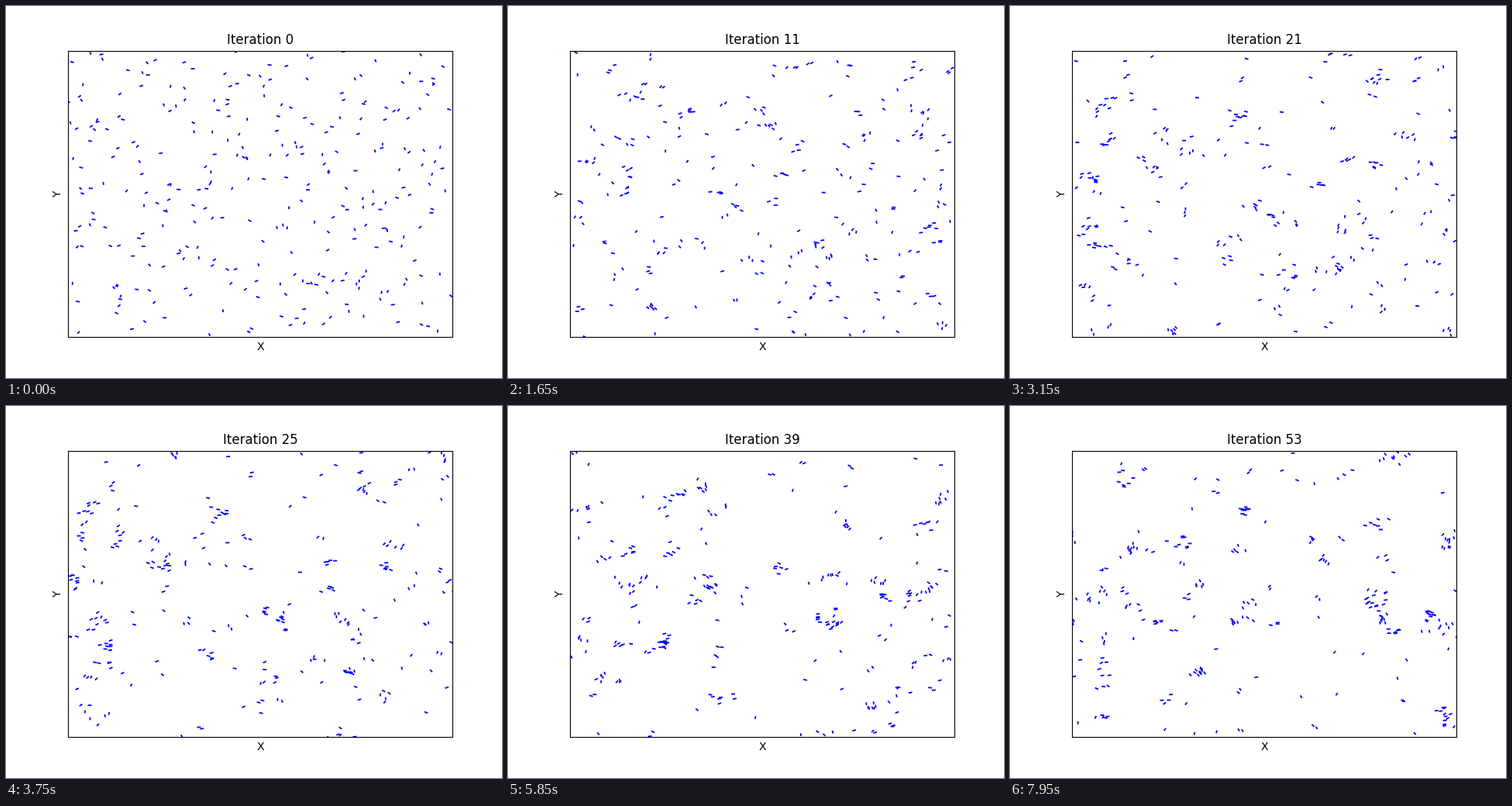
A matplotlib script that plays this animation: 640 px wide and 480 px high, repeating every 8000 ms.

```python
import numpy as np
import matplotlib.pyplot as plt
from matplotlib.animation import FuncAnimation
from matplotlib.collections import LineCollection

COUNT, SIZE, SPEED = 300, 100.0, 1.0
RADIUS, NOISE = 2.0, 0.4
TICK_MS, TICKS, TICKS_PER_STEP = 50, 160, 3


def simulate(steps):
    """Flocking particles in a periodic box: align with neighbours, add noise."""
    rng = np.random.default_rng(7)
    pos = rng.uniform(0, SIZE, (COUNT, 2))
    heading = rng.uniform(-np.pi, np.pi, COUNT)
    states = []
    for _ in range(steps):
        step = SPEED * np.column_stack([np.cos(heading), np.sin(heading)])
        states.append(np.stack([pos, pos + step], axis=1))
        gap = pos[:, None] - pos[None]
        gap -= SIZE * np.round(gap / SIZE)
        near = (gap ** 2).sum(axis=2) < RADIUS ** 2
        heading = np.arctan2(near @ np.sin(heading), near @ np.cos(heading))
        heading += rng.uniform(-NOISE, NOISE, COUNT)
        move = np.column_stack([np.cos(heading), np.sin(heading)])
        pos = (pos + SPEED * move) % SIZE
    return states


states = simulate((TICKS - 1) // TICKS_PER_STEP + 1)

plt.rcParams["font.family"] = "DejaVu Sans"
fig, ax = plt.subplots(figsize=(6.4, 4.8), dpi=100)
ax.set(xlim=(0, SIZE), ylim=(0, SIZE), xticks=[], yticks=[],
       xlabel="X", ylabel="Y")
title = ax.set_title("Iteration 0")
dashes = LineCollection([], colors="blue", linewidths=1.3, capstyle="butt")
ax.add_collection(dashes)


def update(tick):
    step = tick // TICKS_PER_STEP
    dashes.set_segments(states[step])
    title.set_text(f"Iteration {step}")
    return dashes, title


anim = FuncAnimation(fig, update, frames=TICKS, interval=TICK_MS,
                     repeat=True, repeat_delay=0)
plt.show()
```
